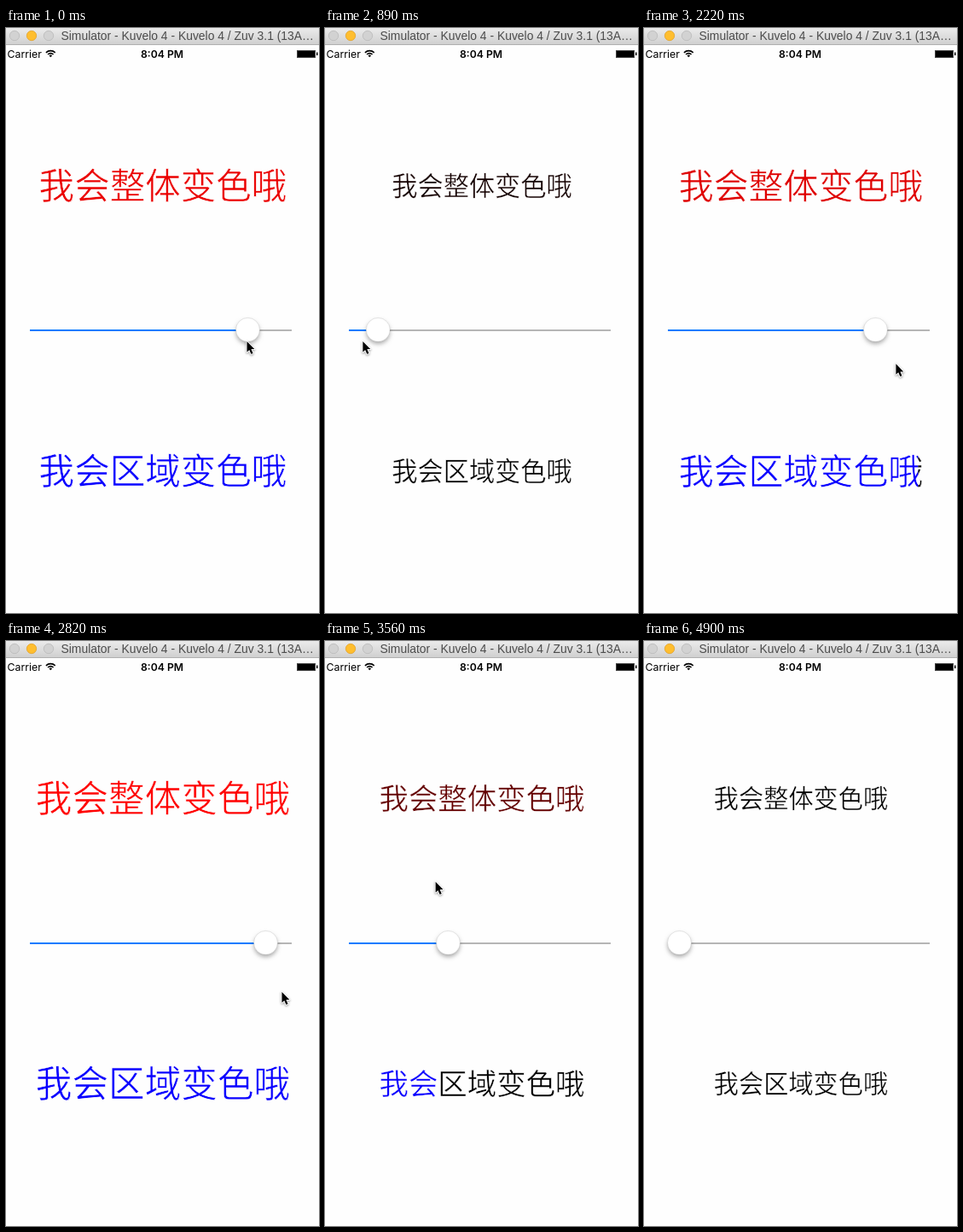
Recreate the animation shown at these times as an HTML page with a canvas. Size 367x685 px, loop 5350 ms.

```html
<!DOCTYPE html>
<html lang="zh">
<head>
<meta charset="utf-8">
<title>Slider</title>
<style>
html, body { margin: 0; width: 100%; height: 100%; overflow: hidden; background: #fefefe; }
canvas { display: block; width: 367px; height: 685px; }
</style>
</head>
<body>
<canvas id="stage"></canvas>
<script>
const W = 367, H = 685, LOOP = 5350, STEP = 148.4, LAST = 33;
const MIN_X = 41.5, RANGE = 280, PAPER = '#fefefe';
const canvas = document.getElementById('stage');
const dpr = window.devicePixelRatio || 1;
canvas.width = W * dpr;
canvas.height = H * dpr;
const ctx = canvas.getContext('2d');
ctx.scale(dpr, dpr);

// Cosine-eased swings [from step, to step, end value], resting in between
function swing(step, value, swings) {
  for (const [t0, t1, end] of swings) {
    const p = Math.min(1, Math.max(0, (step - t0) / (t1 - t0)));
    value += (end - value) * (1 - Math.cos(Math.PI * p)) / 2;
  }
  return value;
}

const thumbX = s => swing(s, 283.5, [[0, 7.4, MIN_X], [8.93, 16.87, 306], [18.54, 28.1, MIN_X]]);
const pointerX = s => swing(s, 282.5, [[0, 7.74, 12], [7.87, 16.84, 327], [18.35, 27.8, 24], [29, 32, 313]]);
const pointerY = s => swing(s, 367, [[10.5, 18.5, 411], [19, 24, 282], [24, 28, 302], [29, 33, 700]]);

function rect(x, y, w, h, color) {
  ctx.fillStyle = color;
  ctx.fillRect(x, y, w, h);
}

function disc(x, y, r, fill, stroke) {
  ctx.beginPath();
  ctx.arc(x, y, r, 0, 2 * Math.PI);
  ctx.fillStyle = fill;
  ctx.fill();
  if (stroke) {
    ctx.strokeStyle = stroke;
    ctx.lineWidth = 0.8;
    ctx.stroke();
  }
}

function text(str, x, y, font, color, align = 'left') {
  ctx.font = font;
  ctx.fillStyle = color;
  ctx.textAlign = align;
  ctx.fillText(str, x, y);
}

function titleBar() {
  const g = ctx.createLinearGradient(0, 0, 0, 19);
  g.addColorStop(0, '#ebebeb');
  g.addColorStop(1, '#d0d0d0');
  rect(0, 0, W, 19, g);
  rect(0, 19, W, 1, '#b0b0b0');
  disc(10, 9, 5.7, '#d2d2d2', '#bababa');
  disc(30, 9, 5.7, '#ffbe2f', '#e2a32b');
  disc(50, 9, 5.7, '#d2d2d2', '#bababa');
  text('Simulator - Kuvelo 4 - Kuvelo 4 / Zuv 3.1 (13A…', 64.5, 14,
    '13.9px "Liberation Sans", Arial, sans-serif', '#4c4c4c');
}

function wifi(x, y) {
  const arc = r => ctx.arc(x, y, r, -Math.PI * 0.75, -Math.PI * 0.25);
  ctx.strokeStyle = ctx.fillStyle = '#000';
  ctx.lineWidth = 1.6;
  for (const r of [4.6, 7.6]) {
    ctx.beginPath();
    arc(r);
    ctx.stroke();
  }
  ctx.beginPath();
  ctx.moveTo(x, y);
  arc(2.6);
  ctx.fill();
}

function statusBar() {
  text('Carrier', 1.6, 35, '12.3px Inter, Roboto, sans-serif', '#000');
  wifi(52.3, 34.2);
  text('8:04 PM', 183, 35, '600 12.2px Inter, Roboto, sans-serif', '#000', 'center');
  ctx.strokeStyle = '#444';
  ctx.lineWidth = 1;
  ctx.strokeRect(341.5, 26.5, 21, 8);
  rect(342, 27, 20, 7, '#000');
  rect(364, 28.5, 1.5, 3.5, '#000');
}

const zoom = v => 1 + 0.49 * v;

function label(str, cy, v, color) {
  ctx.save();
  ctx.translate(184, cy);
  ctx.scale(zoom(v), zoom(v));
  text(str, 0, 11, '300 29.2px "Noto Sans CJK SC", "Noto Sans CJK", sans-serif', color, 'center');
  // A fine paper-coloured edge gives the thin strokes of a light face
  ctx.strokeStyle = PAPER;
  ctx.lineWidth = 0.45;
  ctx.strokeText(str, 0, 11);
  ctx.restore();
}

function splitLabel(str, cy, v) {
  const half = 102.2 * zoom(v);
  const edge = Math.max(0, 184 + half * (3.068 * v - 1.56));
  const part = (x, w, color) => {
    ctx.save();
    ctx.beginPath();
    ctx.rect(x, cy - 40, Math.max(0, w), 80);
    ctx.clip();
    label(str, cy, v, color);
    ctx.restore();
  };
  part(0, edge, '#0a00ff');
  part(edge, W - edge, '#000');
}

function slider(x) {
  rect(28, 353, 307, 2, '#b6b6b6');
  rect(28, 353, x - 28, 2, '#0a7bff');
  ctx.save();
  ctx.shadowColor = 'rgba(0,0,0,0.32)';
  ctx.shadowBlur = 5 * dpr;
  ctx.shadowOffsetY = 3 * dpr;
  disc(x, 353.3, 13.8, '#fff');
  ctx.restore();
  disc(x, 353.3, 13.9, '#fff', 'rgba(0,0,0,0.13)');
}

function pointer(x, y) {
  ctx.save();
  ctx.translate(x, y);
  const arrow = new Path2D('M0 0V12.5L2.8 9.9L4.9 14.8L7.1 13.9L5 9.1H8.9Z');
  ctx.lineJoin = 'round';
  ctx.strokeStyle = '#fff';
  ctx.lineWidth = 2;
  ctx.shadowColor = 'rgba(0,0,0,0.4)';
  ctx.shadowBlur = 2.5 * dpr;
  ctx.shadowOffsetY = dpr;
  ctx.stroke(arrow);
  ctx.shadowColor = 'transparent';
  ctx.fillStyle = '#000';
  ctx.fill(arrow);
  ctx.restore();
}

function draw(now) {
  const step = Math.min(LAST, Math.floor((now % LOOP + 6) / STEP));
  const x = thumbX(step);
  const v = (x - MIN_X) / RANGE;
  rect(0, 0, W, H, PAPER);
  titleBar();
  statusBar();
  label('我会整体变色哦', 184.2, v, `rgb(${Math.min(255, Math.round(v * 272))},0,0)`);
  splitLabel('我会区域变色哦', 518.2, v);
  slider(x);
  if (step < LAST) pointer(pointerX(step), pointerY(step));
}

function tick() {
  draw(performance.now());
  requestAnimationFrame(tick);
}
tick();
</script>
</body>
</html>
```
